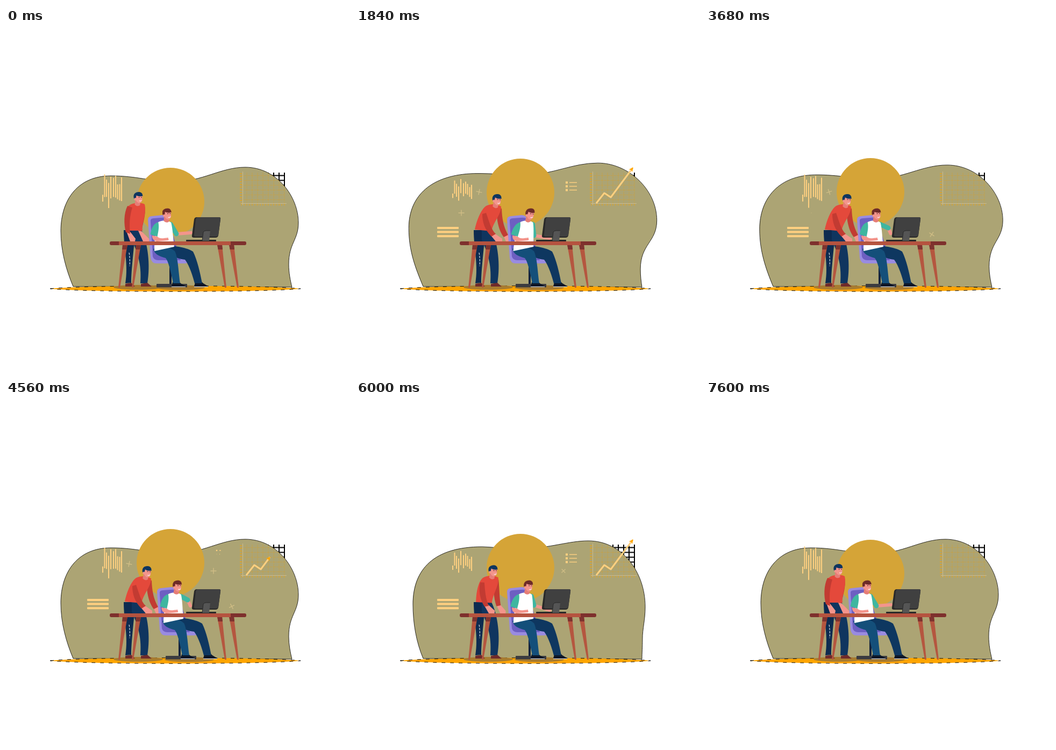
An HTML page with a canvas for the animation above (7.68 s loop, 640 by 640 pixels).

```html
<!DOCTYPE html>
<html lang="en">
<head>
<meta charset="utf-8">
<title>Trading desk</title>
<style>
html, body { margin: 0; height: 100%; overflow: hidden; background: #fff; }
canvas { display: block; width: 100vw; height: 100vh; }
</style>
</head>
<body>
<canvas id="stage" width="640" height="640"></canvas>
<script>
const c = document.getElementById('stage').getContext('2d');
const LOOP = 7680, HALF = LOOP / 2;
const CREAM = '#ffd080', SKIN = '#f3958c', NAVY = '#10355f', ORANGE = '#ffa500';

const ease = k => (1 - Math.cos(Math.PI * Math.max(0, Math.min(1, k)))) / 2;
const ramp = (t, a, b) => ease((t - a) / (b - a));
const pulse = (t, a, b, d, e) => ramp(t, a, b) * (1 - ramp(t, d, e));

// Eased value from rows of [time, ...values]
function keyed(t, rows) {
  let i = 1;
  while (i < rows.length - 1 && rows[i][0] < t) i++;
  const a = rows[i - 1], b = rows[i], k = ramp(t, a[0], b[0]);
  return a.slice(1).map((v, j) => v + (b[j + 1] - v) * k);
}

// Blend two path strings that share one structure
function blend(a, b, k) {
  const n = b.match(/-?[\d.]+/g);
  let i = 0;
  return a.replace(/-?[\d.]+/g, v => +v + (n[i++] - v) * k);
}

function fill(path, color) {
  c.fillStyle = color;
  c.fill(new Path2D(path));
}
function stroke(path, color, width) {
  c.strokeStyle = color;
  c.lineWidth = width;
  c.stroke(new Path2D(path));
}
function oval(x, y, rx, ry, color) {
  c.fillStyle = color;
  c.beginPath();
  c.ellipse(x, y, rx, ry, 0, 0, 7);
  c.fill();
}
function box(x, y, w, h, color, r = 0) {
  c.fillStyle = color;
  c.beginPath();
  c.roundRect(x, y, w, h, r);
  c.fill();
}
function group(draw) {
  c.save();
  draw();
  c.restore();
}

const calm = 'M125 481C112 450 102 415 102 378C102 318 135 275 195 275C245 275 270 286 312 286C365 286 400 259 445 259C505 259 544 315 544 362C544 395 526 400 526 440C526 455 529 470 532 482Z';
const narrow = 'M125 481C112 450 106 415 106 380C106 315 145 273 235 273C260 274 285 277 312 276C360 276 395 262 432 262C495 262 538 320 538 385C538 410 533 425 533 445C533 460 532 470 532 482Z';
const wide = 'M125 481C110 445 96 415 96 370C96 310 140 273 215 270C255 269 290 273 318 273C370 271 405 248 455 248C510 248 566 295 566 350C566 395 528 395 528 450C528 462 530 472 532 482Z';
const shapes = [[0, calm], [620, narrow], [2400, wide], [4600, calm], [5900, narrow], [7600, calm]];

function blobPath(t) {
  let i = 1;
  while (i < shapes.length - 1 && shapes[i][0] < t) i++;
  const [t0, a] = shapes[i - 1], [t1, b] = shapes[i];
  return blend(a, b, ramp(t, t0, t1));
}

function grid(color, width) {
  let d = '';
  for (let x = 448; x < 519; x += 10) d += `M${x} 269V328`;
  for (let y = 274.5; y < 325; y += 9) d += `M437 ${y}H518`;
  stroke(d, color, width);
}

function backdrop(t) {
  const blob = blobPath(t);
  grid('#000', 2);
  fill(blob, '#aca474');
  stroke(blob, '#000', 0.8);
  group(() => {
    c.clip(new Path2D(blob));
    c.setLineDash([5, 1]);
    grid('#c6a148', 0.8);
    c.setLineDash([2, 3]);
    stroke('M437 270V326', '#d5a437', 4);
    stroke('M437 329H520', '#d5a437', 2);
  });
  stroke('M440.5 267V329M437 326.5H522', '#cdbb8c', 1);
}

function coin(t) {
  const [top] = keyed(t, [[0, 253], [640, 241], [1400, 233], [1840, 236], [2840, 239],
    [3600, 235], [4560, 233], [5200, 233], [6000, 242], [6800, 246], [7600, 253]]);
  oval(306, top + 70, 63, 63, '#d5a437');
}

const bars = [[180, 312, 4], [183.5, 296, 12], [187, 302, 12], [191, 308, 13], [195, 294, 13],
  [200, 301, 12], [204, 297, 11], [207.5, 300, 10], [211.5, 305, 9], [215, 305, 13]];

function candles(t) {
  const swell = (1 + Math.cos(2 * Math.PI * (t - 100) / HALF)) / 2;
  let d = '';
  bars.forEach(([x, mid, half], i) => {
    const h = half * (1 + swell * (0.6 + 0.25 * Math.sin(i * 2.4)));
    const y = mid + swell * 5 * Math.sin(i * 1.7 + 2);
    d += `M${x} ${y - h}V${y + h}`;
  });
  stroke(d, CREAM, 2);
}

function trend(t) {
  const u = t % HALF, from = 107 * ramp(u, 2400, 3400), to = 107 * ramp(u, 0, 1240);
  if (to - from < 2) return;
  const pts = [[447, 326, 0], [462, 307, 24.2], [474, 315, 38.6], [515, 260, 107]];
  const point = s => {
    const i = s < 24.2 ? 0 : s < 38.6 ? 1 : 2, [a, b] = [pts[i], pts[i + 1]];
    const k = (s - a[2]) / (b[2] - a[2]);
    return [a[0] + (b[0] - a[0]) * k, a[1] + (b[1] - a[1]) * k, Math.atan2(b[1] - a[1], b[0] - a[0])];
  };
  const tip = point(to);
  const path = [point(from), ...pts.filter(p => p[2] > from && p[2] < to), tip];
  group(() => {
    c.lineJoin = 'round';
    stroke('M' + path.map(p => p[0] + ' ' + p[1]).join('L'), CREAM, 3);
    c.translate(tip[0], tip[1]);
    c.rotate(tip[2]);
    fill('M1 0L-7 -4L-5 0L-7 4Z', ORANGE);
  });
}

function textLines(t) {
  for (let i = 0; i < 3; i++) {
    const squeeze = 1 - i * 0.08 * pulse(t, 2500, 2840, 2900, 3300);
    const half = 20 * squeeze * pulse(t, 430 + i * 200, 1060 + i * 200, 6500 + i * 100, 7200 + i * 100);
    if (half > 0.3) box(171 - half, 370 + i * 7.6, half * 2, 4, CREAM, 1);
  }
}

function bullets(t) {
  const u = t % HALF;
  for (let i = 0; i < 3; i++) {
    const show = pulse(u, 500 + i * 100, 1250 + i * 100, 3050 + i * 80, 3550 + i * 80);
    if (show < 0.01) continue;
    const y = 287.5 + i * 7 - 9 * (1 - ramp(u, 500, 1350)), s = 4 * Math.min(1, show * 3);
    box(392 - s / 2, y - s / 2, s, s, CREAM);
    box(397, y - 0.7, 14 * show, 1.4, CREAM);
  }
}

const sparks = [[196, 344, 600, 3800, 1840], [229, 305, 1000, 5400, 1500],
  [420, 384, 2300, 5700, 2650], [386, 318, 3900, 6700, 4560]];

function sparkles(t) {
  for (const [x, y, start, end, upright] of sparks) {
    const s = 5.5 * pulse(t, start, start + 650, end - 900, end);
    if (s > 0.1) group(() => {
      c.translate(x, y);
      c.rotate((t - upright) * 0.033 * Math.PI / 180);
      stroke(`M${-s} 0H${s}M0 ${-s}V${s}`, '#d0bd85', 1.4);
    });
  }
}

function ground(slide) {
  const d = 'M82 485C150 478 480 478 548 485C480 492 150 492 82 485Z';
  fill(d, ORANGE);
  group(() => {
    c.setLineDash([7, 9]);
    stroke(d, '#000', 0.9);
  });
  oval(246, 482.5, 46, 4.5, '#a87c30');
  oval(341 + slide, 483, 46, 4.5, '#a87c30');
}

function head(x, y, hair, tilt) {
  group(() => {
    c.translate(x, y);
    c.rotate(tilt);
    fill('M-5 5L4 6L4 14Q-1 18 -6 13Z', '#e67d77');
    fill('M-6 -6Q1 -9 8 -5L8 5Q6 11 1 10Q-6 7 -6 -6Z', SKIN);
    fill('M-8 0Q-9 -8 -2 -10Q5 -12 8 -7L9 -3Q2 -1 -3 -4L-4 3L-6 4Z', hair);
    oval(-5, 3, 2, 2.4, SKIN);
    stroke('M1 -.5H3.2M5.5 -.5H7.5', '#4b2228', 1);
    stroke('M2.5 6Q5 7.4 7 5', '#fff', 1);
  });
}

function standing(t) {
  const lean = pulse(t, 760, 1700, 5350, 6750);
  const part = (a, b, color) => fill(blend(a, b, lean), color);
  fill('M219 376L241 376C238 410 233 450 233 474L222 475C228 440 219 412 219 376Z', '#0d2b50');
  fill('M234 376L252 376C264 400 269 440 263 475L250 475C252 445 248 425 234 394Z', NAVY);
  group(() => {
    c.setLineDash([4, 2]);
    stroke('M229 418Q231 430 230 443', '#fff', 1);
  });
  fill('M222 481V476L233 474L240 481ZM251 481V476L263 474L271 481Z', '#702b2b');
  part('M245 375L251 377L267 393L266 397L255 397Z', 'M274 386L283 384L288 392L288 397L279 397Z', SKIN);
  part('M251 330L258 332C261 345 255 362 252 378L244 377C246 360 248 345 251 330Z',
    'M263 332L271 336C272 360 276 372 283 385L275 389C264 375 260 350 263 332Z', '#c23b32');
  part('M228 331C235 325 250 324 258 328C262 345 252 362 254 377L226 377C223 360 220 340 228 331Z',
    'M242 331C250 327 262 327 270 332C270 347 256 360 252 378L221 375C224 360 232 338 242 331Z', '#e4493b');
  part('M224 378L231 379L241 392L240 397L231 397Z', 'M250 385L259 383L272 392L272 397L260 397Z', SKIN);
  part('M226 331L235 334C230 350 229 365 231 383L223 380C219 365 219 345 226 331Z',
    'M235 346L242 344C248 360 251 375 260 383L252 388C239 375 235 360 235 346Z', '#c23b32');
  head(245.5 + 16 * lean, 315.5 + 4 * lean, '#0f365f', 0.1 * lean);
}

function chair() {
  fill('M321 435H325V478H321Z', '#14233c');
  box(297, 476, 57, 6.5, '#3b3b40', 1);
  fill('M289 350Q281 350 281 357L286 428Q288 438 297 438H350Q357 438 356 430L318 424V355Q316 348 308 348Z', '#998be0');
  fill('M292 354Q285 354 286 360L290 425Q292 432 300 432H342L318 355Q314 352 306 353Z', '#6d5fc2');
}

function shoe(x) {
  fill(`M${x} 481L${x + 2} 473Q${x + 11} 468 ${x + 17} 475L${x + 27} 481Z`, '#0c1728');
  stroke(`M${x} 481.5H${x + 26}`, '#fff', 1);
}

function seated(t, slide) {
  const [lean, ex, ey, hx, hy] = keyed(t, [[0, -1, 317, 383, 344, 381], [600, 0, 332, 384, 360, 391],
    [1840, 6, 331, 386, 360, 391], [2300, 4, 331, 386, 360, 391], [2800, -2, 340, 372, 344, 382],
    [4560, 1, 338, 372, 343, 383], [5300, 3, 331, 382, 360, 391], [6600, 3, 331, 382, 360, 391],
    [7600, -1, 317, 383, 344, 381]]);
  group(() => {
    c.translate(slide, 0);
    chair();
    shoe(325);
    shoe(367);
    fill('M308 405C335 404 357 410 365 416C373 432 378 455 382 475L368 475C362 452 355 437 350 431C332 429 316 420 308 405Z', '#0e3760');
    fill('M291 411C305 404 321 407 331 415C337 426 338 455 341 475L328 475C323 450 319 434 314 428C300 424 293 420 291 411Z', '#144f7a');
  });
  group(() => {
    c.lineCap = 'round';
    c.lineJoin = 'round';
    const sx = 324 + slide + lean * 0.75;
    stroke(`M${ex} ${ey}L${hx} ${hy}`, SKIN, 6);
    stroke(`M${sx} 365L${ex} ${ey}`, '#3fb6a0', 9);
  });
  group(() => {
    c.translate(slide, 0);
    c.transform(1, 0, -lean / 64, 1, lean * 410 / 64, 0);
    fill('M300 362C307 357 318 357 325 362C328 375 328 390 330 407L293 415C293 395 296 375 300 362Z', '#fff');
    fill('M289 386L299 388C303 393 310 391 319 390L320 395L298 397C291 395 289 391 289 386Z', SKIN);
    fill('M301 361C291 364 288 374 286 384L299 388C301 378 303 370 301 361Z', '#3fb6a0');
    head(317, 346, '#6d2b28', 0.015 * lean);
  });
}

function desk() {
  for (const [x, foot] of [[217, 209], [242, 234], [393, 407], [415, 430]]) {
    const k = (foot - x) * 0.11;
    fill(`M${x} 403H${x + 9}L${foot + 3} 483H${foot}Z`, '#b5563f');
    fill(`M${x} 403H${x + 9}L${x + 8.5 + k} 412H${x + k}Z`, '#7e332f');
  }
  box(193, 397, 254, 7, '#7e302d', 3);
  box(210, 397, 208, 7, '#b5533f');
  box(335, 394, 56, 3, '#292929', 1);
  fill('M355 352H396Q400 352 399 356L395 386Q394 390 390 390H350Q345 390 346 386L350 356Q351 352 355 352Z', '#292929');
  fill('M357 352H396Q400 352 399 356L395 385Q394 388 390 388H353Q349 388 350 384L353 356Q354 352 357 352Z', '#404040');
  fill('M369 377H380L378 396H365L367 380Z', '#555');
  stroke('M365 396L367 380Q368 377 372 377H380', '#292929', 1);
}

function draw(now) {
  const t = Math.min(7600, Math.floor(now % LOOP / 40) * 40);
  const slide = -17 * (1 - pulse(t, 0, 620, 6600, 7560));
  c.clearRect(0, 0, 640, 640);
  backdrop(t);
  coin(t);
  candles(t);
  trend(t);
  textLines(t);
  bullets(t);
  sparkles(t);
  ground(slide);
  standing(t);
  seated(t, slide);
  desk();
}

const start = performance.now();
function tick() {
  draw(performance.now() - start);
  requestAnimationFrame(tick);
}
tick();
</script>
</body>
</html>
```
